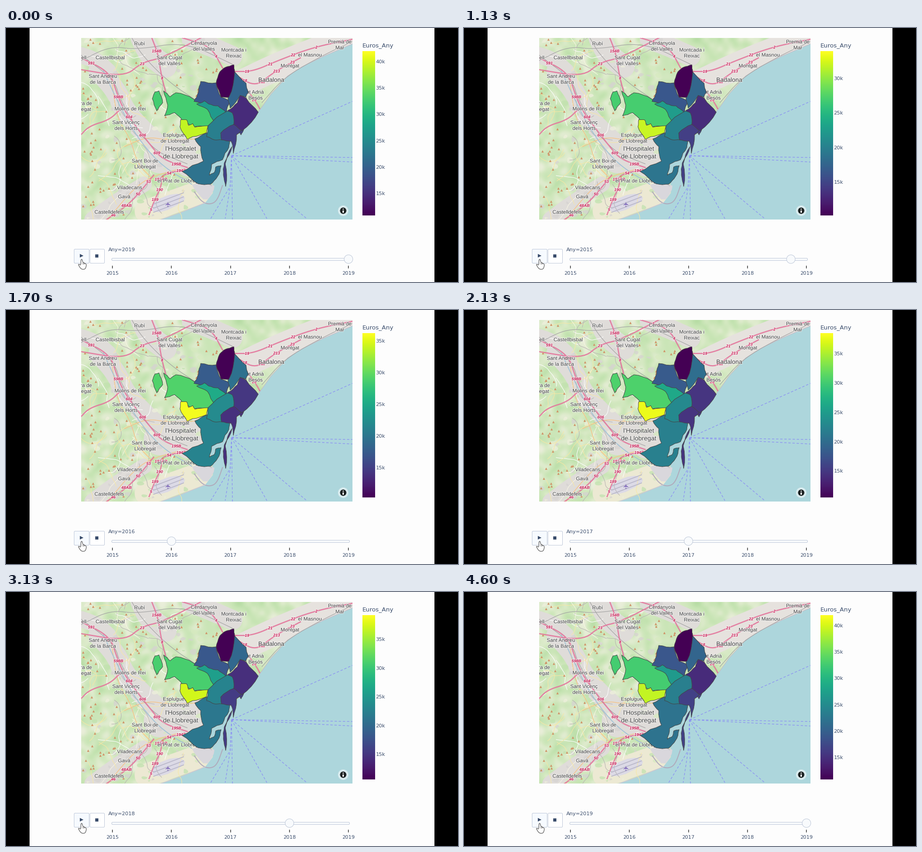
These frames come from a looping animation (998x561 px, 4630 ms). A matplotlib script:

```python
import matplotlib.pyplot as plt
import numpy as np
from matplotlib.animation import FuncAnimation
from matplotlib.colors import LinearSegmentedColormap
from matplotlib.patches import Circle, FancyBboxPatch, Polygon, Rectangle
from matplotlib.patheffects import withStroke

W, H, LOOP, FRAMES = 998, 561, 4630, 139
PX = 0.72  # points per pixel at 100 dpi
INK, BORDER, PAPER = "#3a4d6c", "#bec8d9", "#fdfdfd"
SEA, TOWN, ROAD = "#add6dc", "#dfdcd9", "#dc4f82"
MAP = (166, 765, 423, 22)  # left, right, bottom, top
rng = np.random.default_rng(7)

fig = plt.figure(figsize=(W / 100, H / 100), dpi=100, facecolor=PAPER)


def pixel_axes(left, right, bottom, top, z=0):
    ax = fig.add_axes([left / W, 1 - bottom / H, (right - left) / W, (bottom - top) / H], zorder=z)
    ax.set_xlim(left, right)
    ax.set_ylim(bottom, top)
    ax.axis("off")
    return ax


def smooth(pts, closed=False, rounds=3):
    """Round the corners by repeated cutting."""
    p = np.array(pts, float)
    for _ in range(rounds):
        q = np.roll(p, -1, axis=0)
        cut = np.stack([0.75 * p + 0.25 * q, 0.25 * p + 0.75 * q], axis=1)
        if closed:
            p = cut.reshape(-1, 2)
        else:
            p = np.vstack([p[:1], cut[:-1].reshape(-1, 2), p[-1:]])
    return p


def jagged(pts, amount=0.06, rounds=2):
    """Shift edge midpoints; an edge used by two outlines bends the same way."""
    p = np.array(pts, float)
    for _ in range(rounds):
        q = np.roll(p, -1, axis=0)
        middle, side = (p + q) / 2, (q - p)[:, ::-1] * (1, -1)
        way = np.where(p[:, 0] + 2 * p[:, 1] < q[:, 0] + 2 * q[:, 1], 1, -1)
        push = amount * way * np.sin(middle.sum(axis=1) * 5)
        p = np.stack([p, middle + side * push[:, None]], axis=1).reshape(-1, 2)
    return p


def along(path, f):
    """Point at fraction f of a path's length."""
    run = np.r_[0, np.cumsum(np.hypot(*np.diff(path, axis=0).T))]
    return [np.interp(f * run[-1], run, path[:, k]) for k in (0, 1)]


def write(ax, x, y, text, size, color=INK, font="DejaVu Sans", **kw):
    return ax.text(x, y + 0.36 * size, text, fontsize=size * PX, color=color,
                   family=font, va="baseline", **kw)


# ---------------------------------------------------------------- base map
land = pixel_axes(*MAP, z=1)
built, signs = [], []


def area(color, pts, rounds=2, **kw):
    land.add_patch(Polygon(smooth(pts, True, rounds), fc=color, **{"lw": 0, **kw}))


def line(color, width, pts, curved=True, **kw):
    p = smooth(pts) if curved else np.array(pts, float)
    land.plot(p[:, 0], p[:, 1], color=color, lw=width * PX, **kw)
    return p


def settle(width, *pts, color=TOWN):
    path = line(color, width, pts, solid_capstyle="round", zorder=1)
    built.append((path, width))


def motorway(refs, *pts):
    """A road with its numbers spread evenly along it."""
    path = line(ROAD, 2.3, pts)
    line("#f0b3c5", 0.8, pts)
    names = refs.split()
    for k, name in enumerate(names):
        signs.append((*along(path, (k + 0.5) / len(names)), name))


def wander(color, width, start, heading, steps):
    turns = heading + np.cumsum(rng.normal(0, 0.35, steps))
    path = np.cumsum(np.c_[np.cos(turns), np.sin(turns)] * 9, axis=0) + start
    line(color, width, path)


def draw_land():
    greens = LinearSegmentedColormap.from_list(
        "greens", ["#b4dba2", "#c6e4b3", "#d3e8c0", "#e6edd6", "#f0f1e2"])
    land.imshow(rng.random((38, 56)), cmap=greens, extent=MAP, aspect="auto",
                interpolation="bicubic", vmin=0.05, vmax=1.05)
    land.set_xlim(MAP[0], MAP[1])
    land.set_ylim(MAP[2], MAP[3])
    settle(36, (166, 60), (200, 72), (225, 95))
    settle(46, (205, 95), (245, 140), (262, 185), (330, 255), (400, 305))
    settle(72, (340, 285), (430, 272))
    settle(50, (300, 22), (318, 60), (352, 85))
    settle(44, (410, 25), (450, 40), (500, 62))
    settle(60, (525, 120), (620, 75), (765, 20), color="#e6e2de")
    settle(34, (190, 423), (240, 385), (305, 345))
    settle(52, (310, 405), (430, 362), color="#ece9d3")
    tints = ["#d6d3d1", "#d6eabf", "#eef0dc", "#c2e2af"]
    angles = np.arange(6) * np.pi / 3
    for _ in range(130):
        x, y, r = rng.uniform((170, 25, 2), (440, 420, 6))
        ring = np.c_[x + r * 1.4 * np.cos(angles), y + r * np.sin(angles)]
        area(rng.choice(tints), ring + rng.normal(0, 1.2, (6, 2)), alpha=0.75)


def draw_sea():
    shore = [(765, 35), (700, 63), (655, 85), (622, 106), (585, 146), (564, 176), (521, 227),
             (498, 248), (448, 302), (456, 345), (457, 364), (440, 386), (385, 408), (342, 423)]
    land.add_patch(Polygon(shore + [(765, 423)], fc=SEA, lw=0, zorder=2))
    line("#c3bcc8", 1.2, shore[:7], False)
    area("#d9d7dc", [(408, 342), (461, 344), (458, 362), (441, 384), (420, 362)], 1, zorder=2)
    line("#b0a9bb", 2, [(416, 362), (432, 384), (450, 390), (466, 382), (478, 348)])
    line("#cdc6d2", 1.5, shore[-3:], False)


def draw_ferries():
    port = (498, 282)
    for end in [(765, 162), (765, 286), (765, 296), (664, 421), (576, 421), (500, 423)]:
        line("#8b90f3", 1.3, [port, end], False, dashes=(4, 3))
    for x in (452, 484):
        line("#8b90f3", 1.3, [port, (495, 350), (x, 421)], False, dashes=(4, 3))


def draw_roads():
    for _ in range(60):
        wander(rng.choice(["#ffffff", "#f7e7a5", "#f9f6e4", "#b9b5b3"]), 1.1,
               rng.uniform((170, 30), (400, 390)), rng.uniform(0, 6.3), 9)
    for pts in ([(232, 105), (245, 200), (275, 245), (290, 300), (320, 330)],
                [(262, 262), (310, 240), (360, 248), (425, 245)],
                [(225, 423), (275, 362), (315, 330), (380, 312)]):
        line("#f5c489", 1.5, pts)
    for pts in ([(166, 60), (240, 115), (252, 160), (318, 268), (400, 300)],
                [(278, 22), (300, 60), (360, 120), (420, 160)],
                [(166, 72), (230, 40), (290, 48), (395, 30), (500, 80)],
                [(765, 30), (700, 60), (615, 108), (565, 165)]):
        line("#a3a3a3", 1.2, pts)
    line("#9fc2d6", 1.8, [(215, 95), (262, 195), (300, 255), (345, 305), (410, 345)])
    motorway("591 595 598B 604 606 609 195B", (166, 66), (230, 98), (245, 145), (262, 185),
             (320, 260), (345, 290), (400, 308))
    motorway("23", (166, 92), (262, 108), (300, 76), (345, 66), (430, 22))
    motorway("154B 8", (322, 22), (336, 58), (342, 100), (352, 140))
    motorway("4 4", (390, 22), (452, 40), (478, 88))
    motorway("19 21 22 2 86", (505, 96), (545, 96), (600, 72), (680, 42), (765, 25))
    motorway("18 211 213 23", (510, 106), (552, 130), (590, 98), (650, 66))
    motorway("26", (535, 140), (553, 165), (560, 178))
    motorway("", (166, 235), (185, 216), (228, 203), (252, 180))
    motorway("5 189 190 192AB 54 194", (316, 412), (328, 380), (345, 345), (340, 325), (395, 312))
    motorway("46 48AB 50 53", (222, 423), (268, 392), (296, 362), (326, 325))


def draw_airport():
    area("#dcdae6", [(318, 404), (326, 382), (372, 364), (396, 372), (392, 384), (345, 408)], 1)
    for dy in (0, 9, 18):
        line("#b9b7c9", 1.8, [(326, 389 + dy), (392, 364 + dy)], False)
    write(land, 359, 387, "\u2708", 15, "#7a62b8", ha="center", rotation=90)


def draw_peaks():
    spots = rng.uniform((168, 24), (465, 420), (240, 2))
    for path, width in built:
        gap = np.hypot(*(spots[:, None] - path[None]).transpose(2, 0, 1)).min(axis=1)
        spots = spots[gap > width / 2 + 6]
    wild = spots[(spots[:, 1] < 330) | (spots[:, 0] < 260)]
    land.scatter(*wild.T, s=14, marker="^", c="#cf9468", lw=0, zorder=3)


def label(x, y, text, size=11.4, color="#4b4b4b", **kw):
    write(land, x, y, text, size, color, "Liberation Sans", ha="center", clip_on=True,
          path_effects=[withStroke(linewidth=1.6, foreground="#ffffffb0")], **kw)


def draw_labels():
    for x, y, name in signs:
        label(x, y, name, 9, "#c8285c", style="italic", weight="bold")
    places = [
        (295, 34, "Rubí"), (437, 33, "Cerdanyola|del Vallès"), (361, 65, "Sant Cugat|del Vallès"),
        (503, 48, "Montcada i|Reixac"), (737, 30, "Premià de|Mar"), (671, 59, "el Masnou"),
        (627, 83, "Montgat"), (543, 141, "Sant Adrià|de Besòs"), (230, 65, "Castellbisbal"),
        (172, 65, "ell"), (214, 106, "Sant Andreu|de la Barca"), (177, 166, "ra de|egat"),
        (274, 178, "Molins de Rei"), (265, 208, "Sant Vicenç|dels Horts"),
        (373, 236, "Esplugues|de Llobregat"), (307, 293, "Sant Boi de|Llobregat"),
        (384, 337, "el Prat de Llobregat"), (273, 352, "Viladecans"), (261, 372, "Gavà"),
        (228, 406, "Castelldefels"),
    ]
    for x, y, name in places:
        for row, part in enumerate(name.split("|")):
            label(x, y + 13 * row, part)
    label(586, 114, "Badalona", 13.6)
    label(386, 266, "l'Hospitalet", 14)
    label(386, 283, "de Llobregat", 14)


def draw_info():
    x, y = 744.5, 403.5
    land.add_patch(Circle((x, y), 11.5, fc="white", alpha=0.55, lw=0, zorder=5))
    land.add_patch(Circle((x, y), 7, fc="#1c2222", lw=0, zorder=6))
    land.add_patch(Rectangle((x - 1.2, y - 1), 2.4, 5, fc="white", lw=0, zorder=7))
    land.add_patch(Circle((x, y - 3.4), 1.3, fc="white", lw=0, zorder=7))


# ---------------------------------------------------------------- controls
def shade(t):
    """Viridis with slightly brighter greens towards the top."""
    rgb = np.array(plt.get_cmap("viridis")(t))[..., :3]
    rgb[..., 1] *= 1 + 0.1 * np.asarray(t)
    return np.clip(rgb, 0, 1)


def rounded(ax, x0, y0, x1, y1, fill, r=2):
    ax.add_patch(FancyBboxPatch((x0 + r, y0 + r), x1 - x0 - 2 * r, y1 - y0 - 2 * r,
                                boxstyle=f"round,pad={r}", fc=fill, ec=BORDER, lw=PX))


def year_x(year):
    return 235 + (year - 2015) * 130.3


def draw_controls(ax):
    for x in (0, 946):
        ax.add_patch(Rectangle((x, 0), 52, H, fc="black", lw=0))
    ax.imshow(shade(np.linspace(1, 0, 256))[:, None], extent=(787, 814.5, 413.5, 51),
              aspect="auto", interpolation="bilinear")
    ax.set_xlim(0, W)
    ax.set_ylim(H, 0)
    write(ax, 786.5, 38, "Euros_Any", 13.2)
    rounded(ax, 150.5, 488.5, 183.5, 519.5, "#f6faff")
    rounded(ax, 185.5, 488.5, 217.5, 519.5, "#ffffff")
    ax.add_patch(Polygon([(163, 499), (171, 503), (163, 507)], fc=INK, lw=0))
    ax.add_patch(Rectangle((197.5, 500), 6.5, 6.5, fc=INK, lw=0))
    rounded(ax, 233.5, 508.5, 758.5, 513.5, "#f8fafc")
    for year in range(2015, 2020):
        ax.plot([year_x(year)] * 2, [525, 531], color="#333333", lw=1.5 * PX, solid_capstyle="butt")
        write(ax, year_x(year), 541.5, str(year), 11, ha="center")
    hand = [(165.3, 511), (168.3, 511), (169.5, 518), (177.5, 521), (177, 527),
            (174.5, 533), (166, 533), (159.5, 523), (161, 521.3), (165.5, 524.5)]
    ax.add_patch(Polygon(smooth(hand, True, 2), fc="white", ec="#333333", lw=PX, zorder=9))
    for x in (169.8, 172.6):
        ax.plot([x, x + 0.3], [518.5, 522], color="#333333", lw=0.8 * PX, zorder=10)


for draw in (draw_land, draw_sea, draw_ferries, draw_roads, draw_airport, draw_peaks,
             draw_labels, draw_info):
    draw()
draw_controls(pixel_axes(0, W, H, 0))

# The still scene is rendered once and reused as a backdrop.
fig.canvas.draw()
backdrop = np.array(fig.canvas.buffer_rgba())
fig.clear()
stage = pixel_axes(0, W, H, 0)
stage.imshow(backdrop, extent=(0, W, H, 0), aspect="auto", interpolation="nearest")
stage.set_xlim(0, W)
stage.set_ylim(H, 0)

# ---------------------------------------------------------------- districts
districts = []


def district(first, last, *outlines):
    """Shade runs from first (2015) to last (2019); later ones cover earlier ones."""
    shapes = [stage.add_patch(Polygon(jagged(o), ec="#444444", lw=PX, joinstyle="round"))
              for o in outlines]
    districts.append((first, last, shapes))


district(0.73, 0.70,
         [(348, 139), (362, 152), (375, 143), (414, 157), (426, 164), (450, 180), (465, 209),
          (446, 217), (412, 220), (390, 205), (372, 187), (350, 194), (357, 170)],
         [(329, 141), (338, 139), (346, 165), (333, 183), (323, 156)])
district(0.43, 0.36,
         [(417, 245), (443, 232), (494, 248), (492, 264), (478, 291), (454, 301), (449, 325),
          (460, 319), (463, 307), (475, 304), (467, 328), (452, 345), (424, 344), (389, 317),
          (436, 294), (430, 262)])
district(0.28, 0.26,
         [(430, 118), (464, 121), (475, 153), (495, 160), (487, 187), (460, 180), (415, 162),
          (425, 142)])
district(0.36, 0.31,
         [(505, 97), (530, 122), (535, 142), (529, 153), (517, 149), (495, 177), (490, 155),
          (498, 130)])
district(0.16, 0.12,
         [(517, 149), (531, 156), (557, 186), (521, 227), (500, 215), (490, 182), (511, 165)])
district(0.58, 0.51,
         [(438, 161), (448, 168), (468, 172), (486, 186), (480, 197), (462, 209), (445, 180),
          (421, 168)])
district(0.99, 0.91,
         [(386, 202), (399, 203), (403, 215), (412, 211), (417, 219), (446, 216), (443, 231),
          (412, 240), (400, 246), (384, 218)])
district(0.46, 0.41,
         [(446, 216), (489, 183), (500, 188), (503, 212), (476, 247), (460, 247), (443, 240)])
district(0.13, 0.19,
         [(474, 232), (503, 213), (521, 227), (509, 236), (502, 277), (497, 250), (476, 247)],
         [(516, 229), (525, 224), (519, 236)],
         [(499, 262), (484, 300), (485, 350), (480, 325), (482, 298)])
district(0.0, 0.0,
         [(484, 87), (503, 81), (505, 97), (492, 153), (475, 153), (464, 122), (472, 97)])

thumb = stage.add_patch(Circle((0, 510.5), 9.5, fc="#f8fafc", ec=BORDER, lw=PX, zorder=6))
caption = write(stage, 225.5, 489, "", 11.2)
ticks = [(k, write(stage, 816.5, 0, f"{k}k", 11.2)) for k in range(15, 45, 5)]

# ---------------------------------------------------------------- motion
STARTS = (1061, 1590, 2085, 2630, 3160)  # ms at which 2015, 2016, ... appear
HIGHS = (33.9, 36.2, 38.5, 39.2, 42.0)  # top of the colour bar, in thousands
FADE, GLIDE = 300, 150


def ease(t):
    return 4 * t ** 3 if t < 0.5 else 1 - 4 * (1 - t) ** 3


def state(ms):
    """Previous step, current step (0 is 2015) and time since the switch."""
    step = sum(ms >= s for s in STARTS) - 1
    if step < 0:
        return 3, 4, LOOP
    return (step - 1) % 5, step, ms - STARTS[step]


def update(i):
    before, step, since = state(i * LOOP / FRAMES)
    mix = min(since / FADE, 1)
    for first, last, shapes in districts:
        old, new = (shade(first + (last - first) * s / 4) for s in (before, step))
        for shape in shapes:
            shape.set_facecolor(old + (new - old) * mix)

    # Only the long way back glides; single steps snap.
    go = ease(min(since / GLIDE, 1)) if step < before else 1
    thumb.center = (year_x(2015 + before + (step - before) * go), 510.5)
    caption.set_text(f"Any={2015 + step}")

    low, high = 10.2 + 0.15 * step, HIGHS[step]
    for k, tick in ticks:
        tick.set_visible(k < high)
        tick.set_y(413.5 - 362.5 * (k - low) / (high - low) + 4)
    return []


anim = FuncAnimation(fig, update, frames=FRAMES, interval=LOOP / FRAMES, repeat=True,
                     repeat_delay=0, init_func=lambda: update(0))
plt.show()
```
